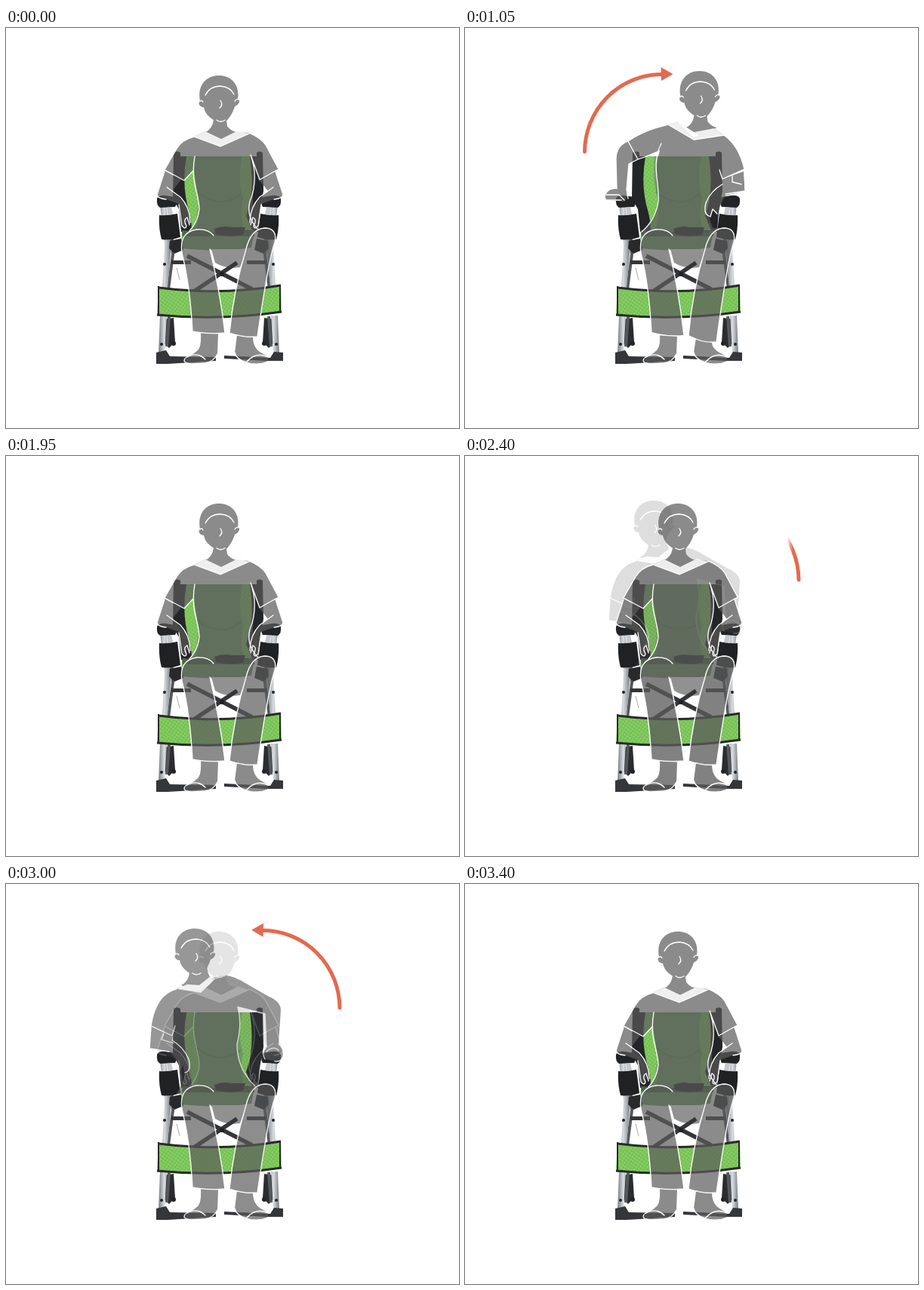
These frames come from a looping animation (600 px wide and 530 px high, 3.75 s). An HTML page:

```html
<!DOCTYPE html>
<html lang="en">
<head>
<meta charset="utf-8">
<title>Leaning in a wheelchair</title>
<style>
html, body { margin: 0; width: 100%; height: 100%; overflow: hidden; background: #fff; }
svg { display: block; width: 600px; height: 530px; }
.body { fill: #5b5b5b; opacity: .7; }
.line { fill: none; stroke: #fff; stroke-width: 1.3; stroke-linecap: round; stroke-linejoin: round; }
.collar { fill: #fff; opacity: .86; }
.tube { fill: none; stroke-linejoin: round; }
</style>
</head>
<body>
<svg viewBox="0 0 600 530">
  <defs>
    <pattern id="mesh" width="4" height="4" patternUnits="userSpaceOnUse" patternTransform="rotate(35)">
      <rect width="4" height="4" fill="#7dc65a"/>
      <circle cx="1" cy="1" r=".8" fill="#9dd77e"/>
      <circle cx="3" cy="3" r=".7" fill="#68b047"/>
    </pattern>
    <linearGradient id="steel">
      <stop offset="0" stop-color="#777b80"/>
      <stop offset=".45" stop-color="#d9dce0"/>
      <stop offset="1" stop-color="#777b80"/>
    </linearGradient>
    <linearGradient id="edge">
      <stop offset=".955" stop-color="#fff"/>
      <stop offset="1" stop-color="#000"/>
    </linearGradient>
    <mask id="wipe" maskUnits="userSpaceOnUse" x="100" y="0" width="300" height="300">
      <rect id="wiper" y="0" width="160" height="300" fill="url(#edge)"/>
    </mask>
    <g id="side">
      <path d="M209 386L222 384L224 416L216 424L210 418Z" fill="#2b2c2f"/>
      <path class="tube" d="M218 250L221 300L215 346M216 382L213 422" stroke="#55585c" stroke-width="4"/>
      <path d="M204 234L212 234L219 288L214 345L207 345L210 288Z M204 381L213 381L210 432L202 432Z" fill="url(#steel)"/>
      <path d="M213 238L219 238L222 250L215 250Z" fill="#c5c8cc"/>
      <path d="M200 226Q202 221 212 222L224 224Q228 230 224 237L204 238Q199 235 200 226Z" fill="#222326"/>
      <path d="M203 248Q214 249 227 246L231 277Q218 282 206 280Q202 265 203 248Z" fill="#202123"/>
      <path d="M217 282L232 279L235 294L223 299L216 292Z" fill="#27292b"/>
      <path d="M219 308L245 308L245 313L219 313Z" fill="#333539"/>
      <g fill="#222428">
        <circle cx="210" cy="313" r="2"/><circle cx="222" cy="418" r="3"/><circle cx="206" cy="419" r="2"/>
      </g>
    </g>
    <g id="chair">
      <path d="M222 165Q226 162 231 165V170H332V165Q336 162 340 165L341 216L336 244L334 270H232L229 240L221 226Z" fill="#242528"/>
      <path d="M239 170H323Q330 216 318 249L326 268H246Q246 258 243 245Q232 210 239 170Z" fill="url(#mesh)"/>
      <path d="M251 170H313Q306 200 314 225Q308 250 316 268H251Q261 245 254 222Q248 195 251 170Z" fill="#72a165"/>
      <path d="M253 217Q283 242 311 220" fill="none" stroke="#628f56" stroke-width="2"/>
      <path d="M233 270Q283 266 329 270L325 291Q283 297 232 292Z" fill="#72a165"/>
      <path d="M233 268Q283 272 329 268V276H234Z" fill="#4d6445"/>
      <path d="M276 266Q288 261 298 264L317 264L314 274Q296 278 278 273Z" fill="#202321"/>
      <path d="M272 293H319L310 317Q292 320 277 311Z" fill="#919191"/>
      <path d="M240 302L326 346M306 311L246 351" stroke="#34363a" stroke-width="5.500" fill="none"/>
      <circle cx="286" cy="326" r="3" fill="#1e2022"/>
      <path d="M226 318L230 334" stroke="#a9abad"/>
      <use href="#side"/>
      <use href="#side" transform="matrix(-1 0 0 1 564 0)"/>
      <path d="M202 343Q283 354 364 340L365 377Q283 389 200 381Z" fill="url(#mesh)"/>
      <path d="M202 344Q283 355 364 341M200 380Q283 388 365 376" stroke="#292b2a" stroke-width="3" fill="none"/>
      <path d="M202 342V381M363 340V377" stroke="#292b2a" stroke-width="2"/>
      <path d="M199 430L212 427L217 435L278 436V441L214 445H199Z M289 434L350 437L355 429L367 430V441H344L289 438Z" fill="#34363a"/>
    </g>
  </defs>
  <use href="#chair"/>
  <g id="right"></g>
  <g id="left"></g>
  <g id="center"></g>
  <g id="arcRight"><g mask="url(#wipe)" id="arc">
    <path d="M158.500 164A102 103 0 0 1 260 61.500" fill="none" stroke="#e36a4f" stroke-width="5" stroke-linecap="round"/>
    <path d="M259.500 52L275.500 61L260 70Z" fill="#e36a4f"/>
  </g></g>
  <g id="arcLeft" transform="matrix(-1 0 0 1 600.500 0)"><use href="#arc"/></g>
</svg>
<script>
const $ = id => document.getElementById(id);
const path = d => `<path d="${d}"/>`;
const moved = (t, s) => `<g transform="${t}">${s}</g>`;
const pair = s => s + moved("matrix(-1 0 0 1 567 0)", s);

const head = {
  fill: "M257 97C253 76 265 63 282 63S310 76 307 94C311 95 309 102 303 104C300 114 295 120 292 123L293 130Q296 135 305 138L285 150L264 138Q273 134 275 122C267 117 263 111 262 105C256 105 254 99 257 97Z",
  line: "M264 89Q270 77 284 77Q297 78 302 88M284 96Q288 102 283 106M279 122Q284 126 290 122M257 97Q259 95 261 98M303 97Q306 93 308 95"
};

const forearm = {
  fill: "M210 189L200 221Q201 226 212 227L229 233Q230 250 233 262L239 265L240 254L243 262Q246 250 238 235Q230 224 220 216L232 201Z",
  line: "M210 190L200 221Q201 226 212 227M213 211L231 224Q244 238 244 258M229 234L233 262Q238 268 239 262Q234 254 240 251L243 261"
};

const poses = {
  center: {
    shift: "", drop: 0,
    body: path("M264 137L249 144Q233 148 226 160L210 188L236 202L249 188C251 215 264 240 243 269L335 269C325 250 326 230 329 205L326 180L336 201L361 187L344 155Q338 146 321 139L306 137L285 148Z")
      + pair(path(forearm.fill)),
    collar: "M264 137L285 147L307 136L322 140L284 157L249 144Z",
    line: path("M249 144Q233 148 226 160L210 188L236 202L248 189M250 170C244 205 255 215 256 240Q254 257 243 269M322 139Q338 146 344 155L361 187L336 201L324 168M324 168Q335 200 323 230Q318 250 333 266M249 144L284 157L322 140")
      + pair(path(forearm.line))
  },
  right: {
    shift: "translate(28.5 -6)", drop: 7,
    body: path("M281 124L269 128Q238 135 216 150L229 174L258 162Q250 190 255 220Q258 245 234 270L250 282L335 278Q319 250 323 235L338 216L341 200L370 187Q363 156 343 142L330 133L303 145Z")
      + path("M216 150Q200 156 200 174L201 213Q190 213 187 220Q184 224 188 228L210 230Q216 229 214 214L217 180L229 174Z")
      + path("M369 190L371 216L345 222Q338 232 334 248L328 240L325 250Q315 248 319 232Q326 216 341 207L341 200Z"),
    collar: "M281 123L303 138L330 133L343 142L303 148L269 128Z",
    line: path("M269 128Q238 135 216 150L229 174L244 169M260 153C246 180 258 205 256 230Q252 255 234 270M343 142Q363 156 370 187L341 200L337 188M216 150Q200 156 200 174L201 213M229 174L217 180L214 214L216 226M187 221H204L211 228M188 228H207M269 128L303 148L343 142M370 190L371 216L345 220M354 196V204L366 207M341 207Q325 216 319 232Q315 247 325 250M325 250L328 240L334 246")
  },
  left: {
    shift: "translate(-32 -4)", drop: 0,
    body: path("M246 116L266 106Q266 119 272 125L290 121Q303 122 318 132L346 149L307 163Q313 185 306 212Q306 245 330 268L312 282L226 278Q242 250 238 235L223 216L220 201L192 188Q198 156 214 144L228 138L246 132Z")
      + path("M318 132L348 149Q364 156 364 167L361 212Q369 219 367 228Q365 236 356 235L343 232Q338 224 345 215L343 172L307 163L300 150Z")
      + path("M192 188L190 218L216 222Q228 232 231 248L234 240L237 250Q246 248 242 232Q235 216 220 207L220 201Z"),
    collar: "M226 139L240 133L256 134L270 123L278 125L258 144Z",
    line: path("M226 139Q198 146 192 188L220 201L224 188M278 125L290 121M192 190L190 218L216 222M209 198L206 206L222 211M220 207Q235 216 242 232Q246 248 237 250M307 163Q313 185 306 212Q306 245 330 268M307 163L343 172L345 215Q338 224 343 232M361 212Q369 219 367 228Q365 236 356 235M345 222Q354 214 361 220")
  }
};

// The hem drop lengthens the trouser legs slightly.
function legs(drop) {
  const a = 402 + drop / 4, b = 404 + drop / 2, c = 409 + drop;
  return {
    fill: path(`M233 298Q229 268 257 266L335 265Q362 265 356 284Q349 305 333 ${c}Q315 ${c} 296 ${b}Q302 345 318 293L270 293Q283 347 290 ${b}Q270 ${b + 2} 247 ${a}Q244 342 233 298Z`)
      + path(`M258 ${b}Q259 422 254 427Q249 432 238 437Q234 443 246 445L264 444Q275 442 280 432L281 ${b}Z`)
      + path(`M306 ${b + 3}L303 430Q305 439 318 443Q333 448 346 442Q350 437 341 432Q327 426 327 ${c}Z`),
    line: path(`M270 293Q283 347 290 ${b}Q270 ${b + 2} 247 ${a}Q244 342 233 298Q229 270 253 267Q268 266 275 275M318 293Q302 345 296 ${b}Q315 ${c + 2} 333 ${c}Q348 305 356 284Q360 265 342 265Q324 267 318 293M238 437Q253 428 264 439M318 443Q331 428 347 436M237 438Q233 444 246 445L264 444Q275 442 280 432M303 430Q305 439 318 443Q333 448 347 442`)
  };
}

function figure(p) {
  const leg = legs(p.drop);
  return `<g class="body">${moved(p.shift, path(head.fill))}${p.body}${leg.fill}</g>`
    + `<g class="line">${moved(p.shift, path(head.line))}${p.line}${leg.line}</g>`
    + `<path class="collar" d="${p.collar}"/>`;
}

for (const id in poses) $(id).innerHTML = figure(poses[id]);

const LOOP = 3750, STEP = 50;
const clamp = v => Math.max(0, Math.min(1, v));
const progress = (t, from, count) => clamp((Math.floor((t - from) / STEP) + 1) / count);

// Each lean: start and steps out, start and steps back, and how the poses cross-fade.
const leans = [
  { id: "right", arc: "arcRight", go: 400, n: 11, back: 1500, m: 10,
    rise: p => (p - .45) * 2.6, fall: p => (1 - p) * 2.2 },
  { id: "left", arc: "arcLeft", go: 2400, n: 7, back: 3000, m: 9,
    rise: p => p * 2, fall: p => (1 - p) * 2 }
];

function show(id, opacity) {
  const el = $(id);
  el.style.opacity = opacity;
  el.style.display = opacity > 0 ? "" : "none";
}

function draw(t) {
  let center = 1, wipe = 0;
  for (const l of leans) {
    const p = progress(t, l.go, l.n), q = progress(t, l.back, l.m);
    show(l.id, clamp(l.rise(p)) * (1 - q));
    show(l.arc, p > 0 ? clamp(2 - 2 * q) : 0);
    if (p > 0 && q < 1) {
      center = q > 0 ? clamp(2 * q) : clamp(l.fall(p));
      wipe = p;
    }
  }
  show("center", center);
  $("wiper").setAttribute("x", -4 + 125 * wipe);
}

const start = performance.now();
function tick() {
  draw((performance.now() - start) % LOOP);
  requestAnimationFrame(tick);
}
tick();
</script>
</body>
</html>
```
